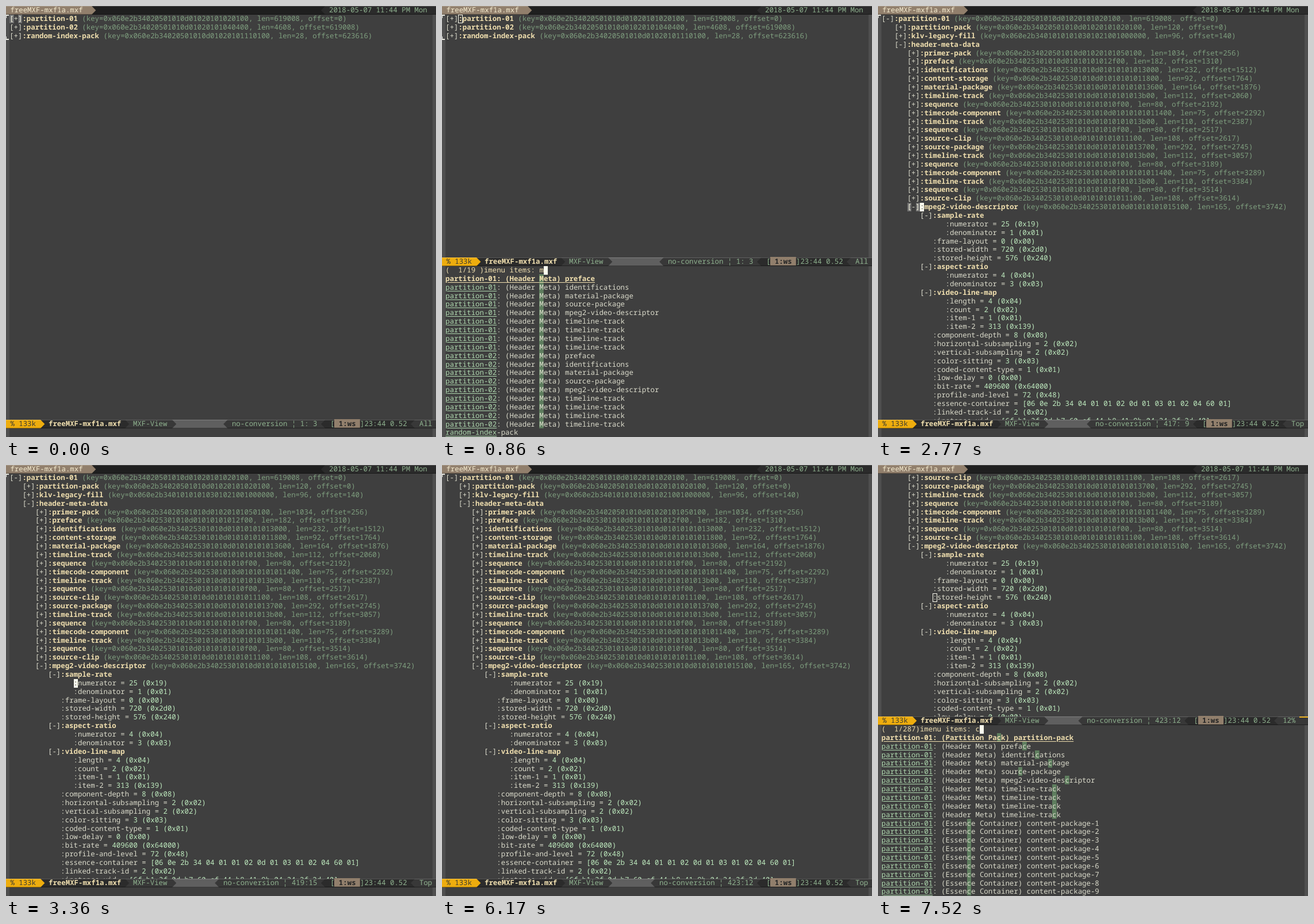
An HTML page that plays this animation: 748x749 px, repeating every 8 s.

```html
<!DOCTYPE html>
<html lang="en">
<head>
<meta charset="utf-8">
<title>MXF-View</title>
<style>
html, body { margin: 0; width: 100%; height: 100%; overflow: hidden; background: #3f3f3f; }
#stage {
  position: relative; width: 748px; height: 749px; overflow: hidden;
  background: #3f3f3f; color: #dcdccc;
  font: 12.3875px/14.865px "Noto Sans Mono", "DejaVu Sans Mono", monospace;
  text-rendering: geometricPrecision; font-variant-ligatures: none;
}
#stage div { position: absolute; white-space: pre; }
svg { position: absolute; left: 0; top: 0; }
b { color: #f0dfaf; }
.key { color: #7f9f7f; }
.val { color: #bfebbf; }
.fringe { top: 15px; bottom: 0; width: 6px; background: #4f4f4f; }
.corner { left: 0; width: 4px; height: 4px; border: 0 solid #e8e8e0; border-left-width: 1px; }
.open { border-top-width: 2px; }
.close { border-bottom-width: 2px; }
.pane { left: 0; width: 748px; overflow: hidden; }
.paren { background: #6f6f6f; font-weight: 700; }
.solid { background: #ffffef; color: #3f3f3f; }
.hollow { box-sizing: border-box; width: 7.4325px; height: 14.865px; border: 1px solid #ffffef; }
u { color: #afd8af; text-decoration: underline 1px; text-underline-offset: 2px; }
.pick { font-weight: 700; color: #f0dfaf; text-decoration: underline 1px; text-underline-offset: 2px; }
/* Keeps the fill within one text row. */
mark, .ws { background: linear-gradient(var(--fill) 0 0) center / 100% 14.865px no-repeat; }
mark { --fill: #5f7f5f; color: inherit; }
.ws { --fill: #917f6c; color: #262626; font-weight: 700; }
.prompt { color: #f0dfaf; }
.bar { left: 0; width: 748px; height: 15px; color: #8fb28f; }
.bevel {
  inset: 0;
  box-shadow: inset 0 1px rgba(255, 255, 255, .2), inset 0 -1px rgba(0, 0, 0, .4);
}
.title { color: #f5ecd0; }
.size { color: #3e3d31; }
</style>
</head>
<body>
<div id="stage"></div>
<script>
const H = 14.865, W = H / 2, LEFT = 6.1, LOOP = 8000;
const PACK = '060e2b34020501010d01020101';
const SET = '060e2b34025301010d0101010101';
const FILE = 'freeMXF-mxf1a.mxf';

// Packs: indent, fold sign, name, key, length, offset. Fields: indent, name = value.
const folded = `
0 + partition-01 ${PACK}020100 619008 0
0 + partition-02 ${PACK}040400 4608 619008
0 + random-index-pack ${PACK}110100 28 623616`;

const unfolded = `
0 - partition-01 ${PACK}020100 619008 0
3 + partition-pack ${PACK}020100 120 0
3 + klv-legacy-fill 060e2b34010101010301021001000000 96 140
3 - header-meta-data
6 + primer-pack ${PACK}050100 1034 256
6 + preface ${SET}2f00 182 1310
6 + identifications ${SET}3000 232 1512
6 + content-storage ${SET}1800 92 1764
6 + material-package ${SET}3600 164 1876
6 + timeline-track ${SET}3b00 112 2060
6 + sequence ${SET}0f00 80 2192
6 + timecode-component ${SET}1400 75 2292
6 + timeline-track ${SET}3b00 110 2387
6 + sequence ${SET}0f00 80 2517
6 + source-clip ${SET}1100 108 2617
6 + source-package ${SET}3700 292 2745
6 + timeline-track ${SET}3b00 112 3057
6 + sequence ${SET}0f00 80 3189
6 + timecode-component ${SET}1400 75 3289
6 + timeline-track ${SET}3b00 110 3384
6 + sequence ${SET}0f00 80 3514
6 + source-clip ${SET}1100 108 3614
6 - mpeg2-video-descriptor ${SET}5100 165 3742
9 - sample-rate
15 numerator = 25 (0x19)
15 denominator = 1 (0x01)
12 frame-layout = 0 (0x00)
12 stored-width = 720 (0x2d0)
12 stored-height = 576 (0x240)
9 - aspect-ratio
15 numerator = 4 (0x04)
15 denominator = 3 (0x03)
9 - video-line-map
15 length = 4 (0x04)
15 count = 2 (0x02)
15 item-1 = 1 (0x01)
15 item-2 = 313 (0x139)
12 component-depth = 8 (0x08)
12 horizontal-subsampling = 2 (0x02)
12 vertical-subsampling = 2 (0x02)
12 color-sitting = 3 (0x03)
12 coded-content-type = 1 (0x01)
12 low-delay = 0 (0x00)
12 bit-rate = 409600 (0x64000)
12 profile-and-level = 72 (0x48)
12 essence-container = [06 0e 2b 34 04 01 01 02 0d 01 03 01 02 04 60 01]
12 linked-track-id = 2 (0x02)
12 instance-uid = [6f b1 3f 0d b7 60 cf 44 b8 41 9b 04 24 2f 2d 40]`;

const partitionItems = part => [
  `partition-0${part}: (Partition Pack) partition-pack`,
  ...['preface', 'identifications', 'material-package', 'source-package',
    'mpeg2-video-descriptor', ...Array(4).fill('timeline-track')]
    .map(name => `partition-0${part}: (Header Meta) ${name}`),
];

const items = [
  ...partitionItems(1),
  ...Array.from({ length: 266 }, (_, i) => `partition-01: (Essence Container) content-package-${i + 1}`),
  ...partitionItems(2),
  'random-index-pack',
];

const div = (x, y, html, cls = '') =>
  `<div class="${cls}" style="left:${x}px;top:${y}px">${html}</div>`;
const cell = (col, row, html, cls) => div(LEFT + col * W, row * H, html, cls);

function treeRow(line, row) {
  const [indent, sign, name, key, len, offset] = line.split(' ');
  if (!/^[+-]$/.test(sign)) {
    const [label, value] = line.slice(indent.length + 1).split(' = ');
    return cell(+indent, row, `:${label} = <span class="val">${value}</span>`);
  }
  const info = key ? ` <span class="key">(key=0x${key}, len=${len}, offset=${offset})</span>` : '';
  return cell(+indent, row, `[${sign}]<b>:${name}</b>${info}`);
}

function tree(s, bottom) {
  const lines = s.tree.trim().split('\n').slice(s.scroll || 0);
  let html = lines.map(treeRow).join('');
  const [row, col] = s.at;
  if (s.parens) html += cell(col - 3, row, '[', 'paren') + cell(col - 1, row, ']', 'paren');
  if (s.cursor) html += cell(col, row, s.cursor === 'solid' ? ':' : '', s.cursor);
  return `<div class="pane" style="top:15.15px;height:${bottom - 15.15}px">${html}</div>`;
}

// A bar segment with a pointed right or left end.
const right = (end, fill) => `<polygon points="0,0 ${end},0 ${end + 7.4},7.5 ${end},15 0,15" fill="${fill}"/>`;
const left = (tip, fill) =>
  `<polygon points="748,0 ${tip + 7.4},0 ${tip},7.5 ${tip + 7.4},15 748,15" fill="${fill}"/>`;
const bar = (y, fill, shapes, text) =>
  `<div class="bar" style="top:${y}px;background:${fill}"><svg width="748" height="15">${shapes}</svg>` +
  `<div class="bevel"></div>${text}</div>`;

const tabs = bar(0, '#1f1f1f', right(149, '#917f6c') + left(548, '#2b2b2b'),
  div(7.4, 0, FILE, 'title') + div(562, 0, '2018-05-07 11:44 PM Mon'));

function modeLine(s, y) {
  const shift = s.end === '12%' ? -2 * W : 0;
  const state = `no-conversion ¦ ${s.pos}`;
  const start = 541.6 + shift - state.length * W;
  const shapes = right(289, '#383838') + right(207, '#2b2b2b') + right(60, '#eead0e') +
    left(start - 14.8, '#383838') + left(548 + shift, '#2b2b2b') + left(704 + shift, '#383838') +
    (shift ? '<rect x="733" y="0" width="15" height="2" fill="#eead0e"/>' : '');
  const text = div(7.4, 0, '% 133k', 'size') + div(74, 0, `<b>${FILE}</b>`) + div(221, 0, 'MXF-View') +
    div(start, 0, state) + div(564 + shift, 0, '[<span class="ws"> 1:ws </span>]23:44 0.52') +
    div(719 + shift, 0, s.end);
  return bar(y, '#5f5f5f', shapes, text);
}

function menuRow(item, i, query) {
  const mark = text => query ? text.replace(new RegExp(query, 'i'), '<mark>$&</mark>') : text;
  return i ? cell(0, i + 1, `<u>${item.slice(0, 12)}</u>${mark(item.slice(12))}`)
    : cell(0, 1, mark(item), 'pick');
}

function menu(s) {
  const found = items.filter(item => item.toLowerCase().includes(s.query));
  const prompt = `(  1/${String(found.length).padEnd(3)})imenu items: ${s.query}`;
  const col = s.caret ?? prompt.length;
  const html = cell(0, 0, prompt, 'prompt') + cell(col, 0, prompt[col] || ' ', 'solid') +
    found.slice(0, 19).map((item, i) => menuRow(item, i, s.query)).join('');
  return `<div class="pane" style="top:452px;height:297px">${html}</div>`;
}

function scene(s) {
  const split = s.query !== undefined, y = split ? 437 : 719;
  let html = '<div class="fringe" style="left:0"></div><div class="fringe" style="left:742px"></div>';
  if (!s.scroll) html += '<div class="corner open" style="top:15px"></div>';
  if (s.tree === folded) html += '<div class="corner close" style="top:53px"></div>';
  return html + tree(s, y) + tabs + modeLine(s, y) + (split ? menu(s) : '');
}

const start = { tree: folded, at: [0, 3], pos: '1: 3', end: 'All' };
const search = { ...start, cursor: 'hollow' };
const step = (row, col, more) => ({
  tree: unfolded, at: [row, col], pos: `${row + 395}:${String(col).padStart(2)}`,
  end: 'Top', cursor: 'solid', ...more,
});
const again = { ...step(28, 12), at: [14, 12], scroll: 14, end: '12%', cursor: 'hollow' };

const timeline = [
  [0, { ...start, parens: true }],
  [520, { ...search, query: '' }],
  [860, { ...search, query: 'm' }],
  [1630, { ...search, query: 'mp', caret: 0 }],
  [2770, step(22, 9, { parens: true })],
  [3080, step(23, 12, { parens: true })],
  [3360, step(24, 15)],
  [3650, step(25, 15)],
  [3980, step(26, 12)],
  [4300, step(27, 12)],
  [6170, step(28, 12, { cursor: '' })],
  [7090, { ...again, query: '' }],
  [7520, { ...again, query: 'c' }],
].map(([time, s]) => ({ time, html: scene(s) }));

const stage = document.getElementById('stage');
let shown;
function draw() {
  const t = performance.now() % LOOP;
  const now = timeline.findLast(entry => entry.time <= t);
  if (now !== shown) stage.innerHTML = (shown = now).html;
  requestAnimationFrame(draw);
}
draw();
</script>
</body>
</html>
```
